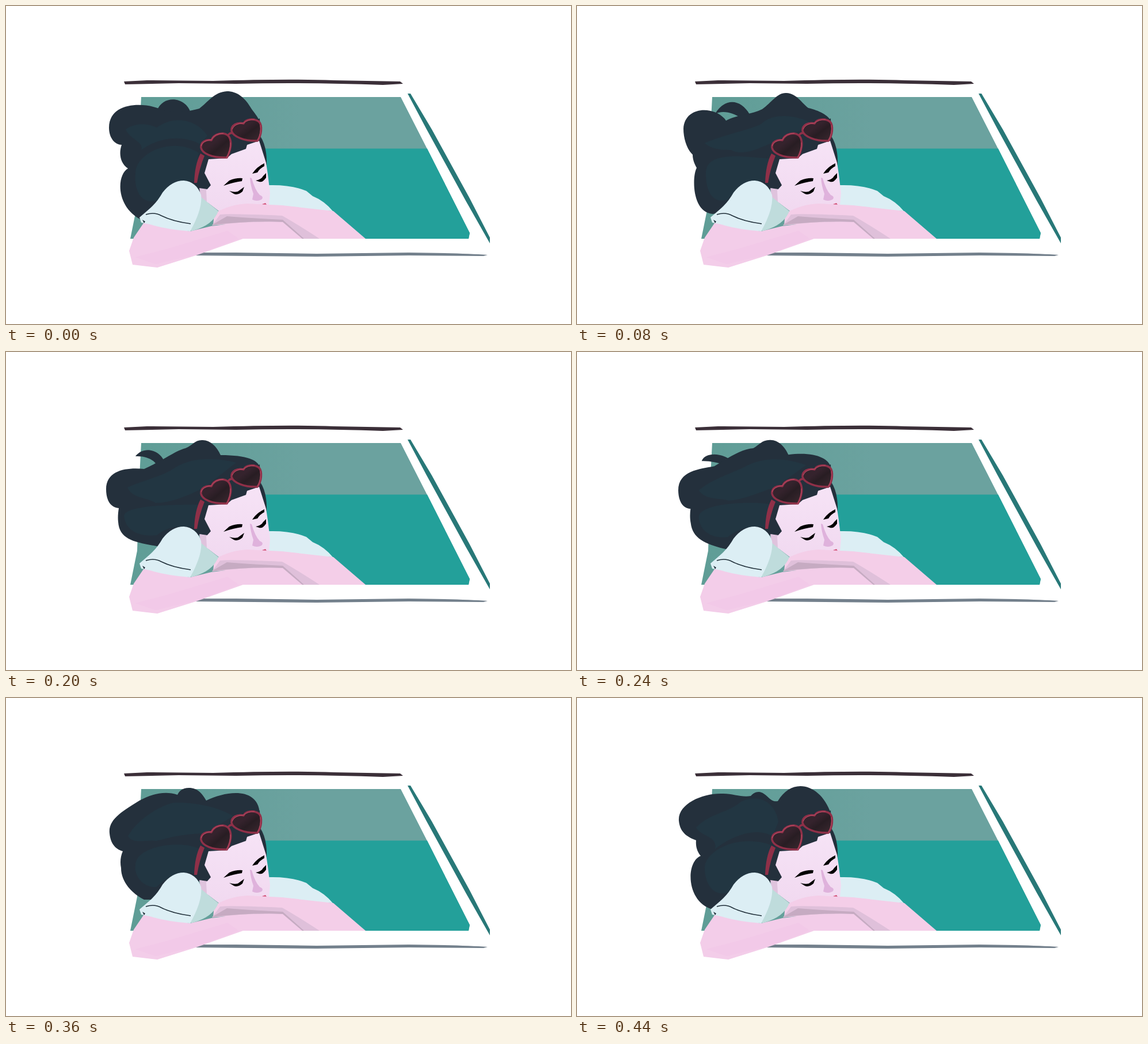
Recreate the animation shown at these times as an HTML page without scripts. Size 982 by 552 pixels, loop 480 ms.

```html
<!DOCTYPE html>
<html lang="en">
<head>
<meta charset="utf-8">
<title>Hair in the wind</title>
<style>
html, body { margin: 0; width: 100%; height: 100%; overflow: hidden; background: #fff; }
svg { display: block; width: 982px; height: 552px; }

/* Each pose steps toward the next at 25 poses a second. */
.wind { animation: 480ms step-end infinite; }
.hair { animation-name: hair; fill: #24303c; }
.lock { animation-name: lock; fill: #24303c; }
.shine { animation-name: shine; fill: #223642; }

@keyframes hair {
  0%, 100% { animation-timing-function: steps(2); d: path("M441 200C436 190 432 186 427 179C415 158 401 148 384 148C362 149 351 167 336 178C320 182 290 190 263 177C238 168 180 166 179 211C179 230 190 241 201 241C196 255 198 273 212 282C192 293 190 350 237 372L320 350L345 310Z"); }
  16.66% { d: path("M441 200C438 190 420 181 402 177C390 168 382 152 364 151C348 150 339 167 322 179C305 188 280 188 259 199C242 173 187 172 185 213C185 230 191 249 201 258C201 266 204 274 208 281C200 295 199 358 236 361L300 350L345 310Z"); }
  25% { animation-timing-function: steps(2); d: path("M441 200C438 191 415 180 388 178C378 163 368 152 354 152C340 151 335 162 315 172C300 180 270 195 257 198C215 190 172 172 172 222C172 245 180 262 197 272C193 280 192 290 194 300C195 345 215 354 255 343L300 350L345 310Z"); }
  41.66% { animation-timing-function: steps(3); d: path("M441 200C438 188 420 179 373 179C367 165 355 153 342 153C328 152 325 162 312 167C295 171 270 190 240 203C212 200 174 204 174 238C174 258 182 270 196 271C195 278 194 287 195 295C197 325 222 330 262 337L300 350L345 310Z"); }
  66.66% { d: path("M441 200C436 176 395 160 356 177C350 163 340 152 325 152C309 152 300 160 295 167C270 163 252 168 236 189C215 210 180 210 180 245C181 265 190 275 200 275C199 283 200 292 203 300C208 320 222 338 240 350L300 350L345 310Z"); }
  75% { animation-timing-function: steps(2); d: path("M441 200C438 155 385 160 348 178C341 166 333 156 318 156C306 156 301 162 298 168C275 160 250 168 232 178C205 195 177 210 180 235C182 255 192 263 203 266C199 275 198 285 200 295C200 320 220 340 240 350L300 350L345 310Z"); }
  91.66% { d: path("M441 200C424 150 375 135 349 179C335 182 330 164 316 163C308 163 304 168 302 170C285 173 270 165 250 166C215 166 175 185 177 213C179 235 194 242 207 247C206 258 209 267 215 274C188 285 190 355 236 367L310 350L345 310Z"); }
}
@keyframes lock {
  0%, 100% { animation-timing-function: steps(2); d: path("M322 190C318 160 275 150 262 182C275 190 300 200 322 190L320 190Z"); }
  16.66% { d: path("M300 188C285 162 258 158 240 187C255 180 272 186 285 194L300 190Z"); }
  25% { animation-timing-function: steps(2); d: path("M288 187C275 160 250 164 235 186C248 180 260 188 280 190L286 190Z"); }
  41.66% { animation-timing-function: steps(3); d: path("M276 192C268 170 240 162 225 181C242 180 256 186 262 196L270 196Z"); }
  66.66% { d: path("M255 185C232 188 190 192 200 206C212 206 235 208 258 200L235 167Z"); }
  75%, 91.66% { d: path("M270 190C265 186 255 186 250 190C255 194 265 194 270 190L270 190Z"); }
}
@keyframes shine {
  0%, 100% { animation-timing-function: steps(2); d: path("M208 214C230 200 250 206 262 211C290 190 330 195 350 225L338 240C310 225 270 225 235 250C240 235 215 232 208 214ZM225 290C225 255 290 225 335 255L328 305C300 298 275 320 262 338C235 345 222 320 225 290Z"); }
  16.66% { d: path("M222 238C250 225 300 215 320 205C340 185 380 188 412 205L345 235C320 245 290 262 268 250C255 250 235 250 222 238ZM224 292C222 250 290 262 337 265L328 305C300 298 275 320 262 336C235 345 224 320 224 292Z"); }
  25% { animation-timing-function: steps(2); d: path("M203 240C225 225 265 220 285 208C320 190 370 190 390 198L345 235C330 255 280 250 262 262C240 255 215 255 203 240ZM219 295C222 250 300 272 335 270L328 305C300 298 280 315 265 332C230 332 218 315 219 295Z"); }
  41.66% { animation-timing-function: steps(3); d: path("M211 235C240 222 275 215 295 200C330 180 370 185 400 192L345 235C325 245 290 262 260 262C245 252 220 255 211 235ZM205 285C205 265 300 265 333 265L328 305C295 300 280 305 262 318C225 322 207 305 205 285Z"); }
  66.66% { d: path("M213 250C225 215 290 190 310 185C345 180 375 190 395 205L345 235C320 230 300 245 270 250C250 255 230 262 213 250ZM225 290C225 258 300 245 337 262L328 305C300 298 275 315 262 328C240 330 222 310 225 290Z"); }
  75% { animation-timing-function: steps(2); d: path("M212 240C225 215 260 190 290 182C330 180 370 190 395 205L345 235C320 235 290 240 262 248C245 245 222 255 212 240ZM225 290C225 258 300 245 337 262L328 305C300 298 275 315 262 328C240 330 222 310 225 290Z"); }
  91.66% { d: path("M207 225C230 200 262 200 285 180C315 165 345 180 350 215L340 240C315 225 275 235 240 262C245 240 215 240 207 225ZM222 295C222 265 280 235 337 255L328 305C300 298 275 320 262 338C235 345 222 320 222 295Z"); }
}
</style>
</head>
<body>
<svg viewBox="0 0 982 552">
  <defs>
    <linearGradient id="haze"><stop stop-color="#5f9d96"/><stop offset=".5" stop-color="#6ba29f"/></linearGradient>
    <linearGradient id="lens" x2="1" y2="1"><stop offset=".4" stop-color="#35232d"/><stop offset=".6" stop-color="#281d23"/><stop offset="1" stop-color="#3b2930"/></linearGradient>
    <linearGradient id="skin" x2="0" y2="1"><stop stop-color="#f6e3f6"/><stop offset="1" stop-color="#f1d9f0"/></linearGradient>
  </defs>

  <g id="window">
    <path fill="url(#haze)" d="M235 158H686L732 248L806 394L804 404H216L228 345L232 215Z"/>
    <path fill="#23a09a" d="M440 247.5H732L806 394L804 404H440Z"/>
    <path fill="#3b2f38" d="M205 131L245 129L360 130Q490 126 570 129L685 131L690 135L655 137Q520 132 400 135L300 134L207 136Z"/>
    <path fill="#287878" d="M698 152H703L740 214L806 334L841 402V412L799 338L731 214Z"/>
    <path fill="#73808c" d="M326 428L400 428L540 430L700 428Q790 429 837 432L830 434L700 433L540 435L326 433Z"/>
  </g>

  <path class="wind lock"/>
  <path class="wind hair"/>
  <path fill="#24303c" d="M328 306L330 260L441 195L442 226Q454 244 453 276L349 320L338 316Z"/>
  <path class="wind shine"/>

  <g id="face">
    <path fill="#dceef4" d="M457 311Q495 310 522 321L533 330Q553 338 568 356L500 352L456 346Z"/>
    <path fill="#dfc3dd" d="M336 316L350 318L352 350L366 358L340 345Z"/>
    <path fill="url(#skin)" d="M352 266L384 264L392 257L417 248L419 241L440 234L452 272L455 292L459 325L457 345L430 352L370 356L349 340L348 320L356 311L345 290Z"/>
    <path fill="#dfb2dc" d="M424 298Q425 312 430 326L428 336Q436 340 444 336Q449 331 441 328Q433 320 427 299Z"/>
    <path fill="#d0486f" d="M445 344L451 342L453 345L448 347Z"/>
    <path d="M378 312L388 303Q400 298 411 299L410 304Q395 306 378 312ZM428 291Q436 279 449 273V278Q441 282 437 289ZM388 321Q397 324 403 322L414 314L411 322Q403 329 396 326ZM434 303Q444 301 447 295L452 290V298Q446 307 440 305Z"/>
  </g>

  <g id="arms">
    <path fill="#f4cee8" d="M362 360Q390 344 420 343L480 346L569 356L625 404H516L486 376L360 380Z"/>
    <path fill="#dfc0da" d="M358 381L372 362Q390 360 480 364Q500 375 545 404H516L482 375Q420 373 358 381Z"/>
    <path fill="#c6abc2" d="M358 380L384 365Q420 368 481 371L518 404H514L480 375Q430 372 358 380Z"/>
    <path fill="#f3cde9" d="M241 374L222 402L214 425L220 449L263 454L330 433L412 404H515L481 375Q420 373 357 382L320 391L246 377Z"/>
    <path fill="#f2c7e8" d="M224 436L285 420L385 390L405 404L330 432L260 448Z" opacity=".6"/>
  </g>

  <g id="sleeve">
    <path fill="#bfdcdc" d="M337 330L369 356Q360 380 325 390L318 391Q338 360 337 330Z"/>
    <path fill="#dceef4" d="M232 367L246 355Q262 342 272 324Q288 303 309 303Q331 305 339 328Q342 352 320 391Q280 388 250 379L235 376Z"/>
    <path fill="none" stroke="#1f2e38" stroke-width="1.5" d="M243 362Q258 357 270 364Q290 374 321 378"/>
    <path fill="#1f2e38" d="M237 371L242 374L240 377Z"/>
  </g>

  <g id="glasses">
    <path fill="#8f3048" d="M338 256L345 260Q336 282 332 307L327 307Q328 275 338 256Z"/>
    <g fill="url(#lens)" stroke="#8f3048" stroke-width="3.5" stroke-linejoin="round">
      <path d="M357 233C348 231 338 236 339 246C341 256 358 264 384 263C390 252 394 236 387 226C378 217 361 222 357 233Z"/>
      <path d="M413 204C402 201 391 207 392 217C395 227 415 235 437 234C444 225 446 208 440 201C431 194 416 196 413 204Z"/>
      <path fill="none" d="M386 224Q390 219 394 221"/>
    </g>
    <path fill="none" stroke="#bd5068" d="M339 243Q341 234 357 232Q363 221 378 221M393 214Q397 204 413 203Q420 197 432 197M383 264Q391 250 390 237M437 234Q444 220 442 207"/>
  </g>
</svg>
</body>
</html>
```
